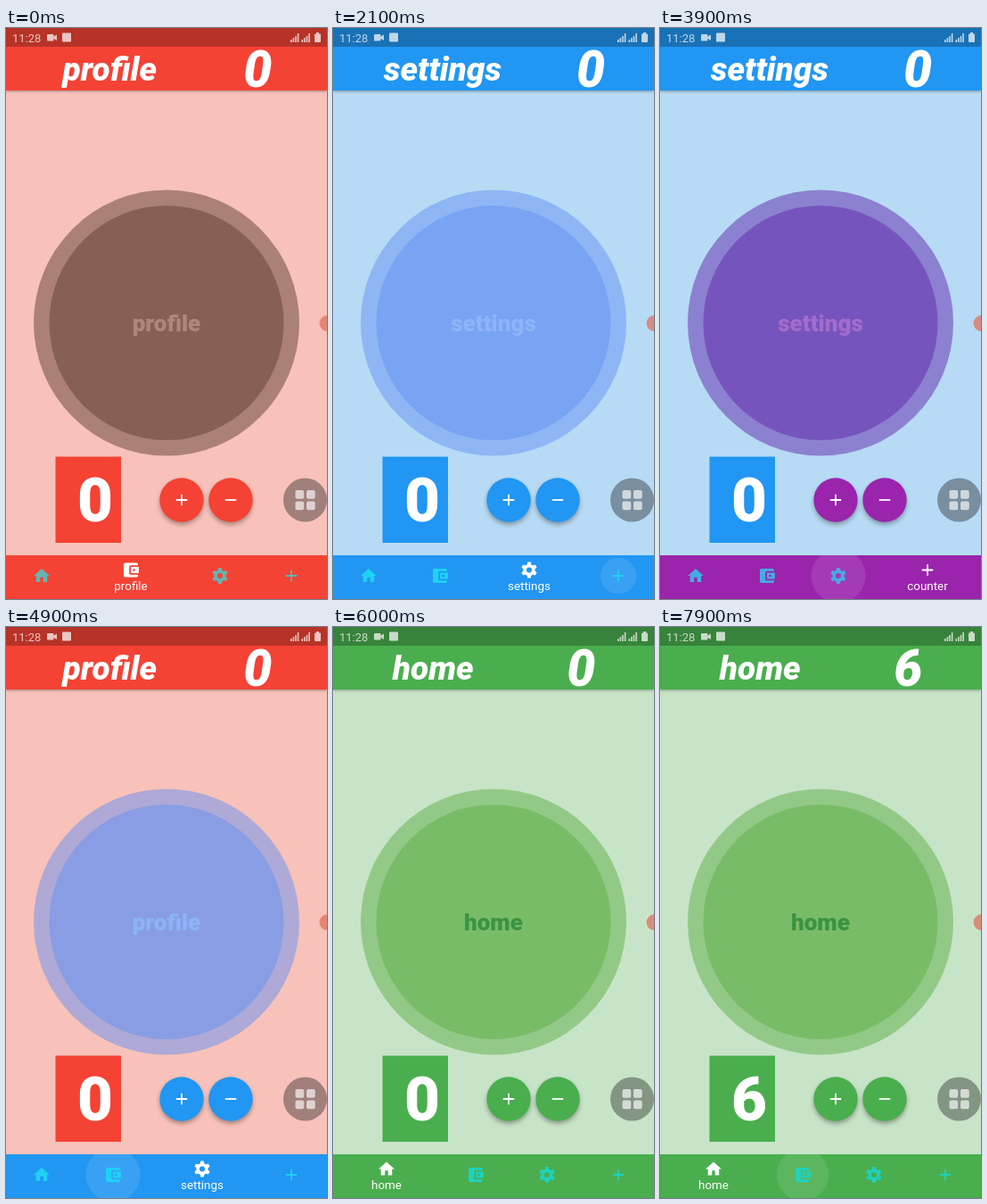
Animation of 360 by 640 pixels, one loop 8 s. Source, as an HTML page:

```html
<!DOCTYPE html>
<html lang="en">
<head>
<meta charset="utf-8">
<style>
  html, body { margin: 0; width: 100%; height: 100%; overflow: hidden; }
  svg { display: block; width: 360px; height: 640px; font-family: Roboto, sans-serif; }
  .heavy { font-weight: 900; }
  .raised { filter: drop-shadow(0 3px 2.5px rgba(0,0,0,.32)); }
</style>
</head>
<body>
<svg id="stage" viewBox="0 0 360 640"></svg>
<script>
const LOOP = 8000, NAV_MS = 150;

// main: theme, bg: page, disc: overlay tint, word: disc label, icon: idle tab icons
const pages = [
  { name: 'home', main: [74, 174, 78], bg: [200, 228, 200], disc: [96, 176, 72], word: [58, 148, 66], icon: [30, 210, 190], titleW: 94 },
  { name: 'profile', main: [244, 66, 52], bg: [248, 194, 186], disc: [99, 66, 50], word: [176, 134, 124], icon: [100, 180, 176], titleW: 110 },
  { name: 'settings', main: [33, 150, 242], bg: [183, 219, 245], disc: [102, 146, 244], word: [140, 180, 247], icon: [30, 210, 245], titleW: 137 },
  { name: 'counter', main: [154, 36, 172], bg: [220, 184, 224], disc: [98, 40, 172], word: [163, 109, 203], icon: [70, 170, 230], titleW: 130 }
];

// each tap: tab, finger down, page swap, start of tab bar change
const taps = [
  [2, 780, 800, 800],
  [3, 2100, 2180, 2220],
  [2, 3700, 3850, 3910],
  [1, 4700, 4850, 4910],
  [0, 5600, 5720, 5800],
  [1, 7850, 9000, 9000]
];
const FIRST_CLICK = 6800, CLICK_GAP = 140, CLICKS = 6;

const clamp = v => Math.max(0, Math.min(1, v));
const ease = v => 1 - (1 - clamp(v)) ** 2;
const mix = (a, b, k) => a + (b - a) * k;
const blend = (a, b, k) => a.map((v, i) => mix(v, b[i], k));
const rgb = c => `rgb(${c.map(Math.round)})`;

const circle = (x, y, r, fill, more = '') => `<circle cx="${x}" cy="${y}" r="${r}" fill="${fill}" ${more}/>`;
const rect = (x, y, w, h, fill, more = '') => `<rect x="${x}" y="${y}" width="${w}" height="${h}" fill="${fill}" ${more}/>`;
const text = (s, x, y, size, fill = '#fff', more = 'text-anchor="middle"') =>
  `<text x="${x}" y="${y}" font-size="${size}" fill="${fill}" ${more}>${s}</text>`;
const heavy = 'class="heavy" text-anchor="middle"';

const plus = '<path d="M19 13h-6v6h-2v-6H5v-2h6V5h2v6h6z"/>';
const minus = '<path d="M5 11h14v2H5z"/>';
const gear = '<circle cx="12" cy="12" r="5.4" fill="none" stroke="currentColor" stroke-width="4"/>' +
  [0, 60, 120, 180, 240, 300].map(a => `<path d="M10 2h4l.8 4h-5.6z" transform="rotate(${a} 12 12)"/>`).join('');
const icons = [
  '<path d="M10 20v-6h4v6h5v-8h3L12 3 2 12h3v8z"/>',
  '<path fill-rule="evenodd" d="M21 18v1c0 1.1-.9 2-2 2H5c-1.1 0-2-.9-2-2V5c0-1.1.9-2 2-2h14c1.1 0 2 .9 2 2v1h-9c-1.1 0-2 .9-2 2v8c0 1.1.9 2 2 2zM12 16h10V8H12zM14.5 12a1.5 1.5 0 0 1 3 0a1.5 1.5 0 0 1-3 0z"/>',
  gear, plus
];
const icon = (art, x, y, color) =>
  `<g transform="translate(${x} ${y}) scale(.89) translate(-12 -12)" fill="${color}" color="${color}">${art}</g>`;

function statusBar() {
  const bars = x => [3, 5, 7, 10].map((h, i) => rect(x + i * 2.6, 16 - h, 1.6, h, '#fff')).join('');
  return rect(0, 0, 360, 21, 'rgba(0,0,0,.25)') +
    '<g opacity=".72">' + text('11:28', 7, 15.5, 13, '#fff', '') +
    rect(46, 7, 7.5, 7.5, '#fff', 'rx="1"') + '<path d="M53 10l4-2.5v6.500l-4-2.500z" fill="#fff"/>' +
    rect(63, 5.5, 10, 10, '#fff', 'rx="1"') + bars(319) + bars(331.5) +
    rect(346, 6.500, 7, 9.500, '#fff', 'rx="1"') + rect(348, 5, 3, 2, '#fff') + '</g>';
}

function header(page, count) {
  const gap = (332 - page.titleW - 33) / 4;
  return rect(0, 0, 360, 70, rgb(page.main), 'style="filter:drop-shadow(0 1px 1.5px rgba(0,0,0,.35))"') + statusBar() +
    text(page.name, 14 + gap + page.titleW / 2, 59, 37, '#fff', heavy + ' font-style="italic"') +
    text(count, 346 - gap - 16.500, 65.500, 57, '#fff', heavy + ' font-style="italic"');
}

function tabBar(from, to, k, ripple) {
  const weights = pages.map((_, i) => 1 + .5 * ((i === from ? 1 - k : 0) + (i === to ? k : 0)));
  let x = 0;
  const centers = weights.map(w => (x += w * 80) - w * 40);
  let out = rect(0, 591, 360, 49, rgb(pages[from].main));
  if (k > 0) out += circle(centers[to], 614, k * 340, rgb(pages[to].main));
  if (ripple) out += circle(centers[ripple.tab], 614, ripple.r, '#fff', `opacity="${ripple.alpha}"`);
  const idle = blend(pages[from].icon, pages[to].icon, k);
  pages.forEach((p, i) => {
    const on = (weights[i] - 1) * 2;
    out += icon(icons[i], centers[i], 614 - 6.500 * on, rgb(blend(idle, [255, 255, 255], on)));
    if (on > 0) out += text(p.name, centers[i], 630, 13.400, '#fff', `text-anchor="middle" opacity="${on}"`);
  });
  return `<g clip-path="url(#bar)">${out}</g>`;
}

function draw(t) {
  let body = 1, from = 1, to = 1, k = 1, ripple = null;
  for (const [tab, down, swap, nav] of taps) {
    if (t >= swap) body = tab;
    if (t >= nav) { from = to; to = tab; k = ease((t - nav) / NAV_MS); }
    if (t >= down && t < nav + NAV_MS)
      ripple = { tab, r: mix(20, 30.500, ease((t - down) / 80)), alpha: .1 * (1 - clamp((t - nav) / NAV_MS)) };
  }
  const count = Math.max(0, Math.min(CLICKS, Math.floor((t - FIRST_CLICK) / CLICK_GAP) + 1));
  const press = t >= FIRST_CLICK && t < 7700 ? .14 : 0;

  const page = pages[body];
  const tint = key => rgb(blend(pages[from][key], pages[to][key], k));
  const fab = tint('main'), disc = tint('disc');

  stage.innerHTML = '<clipPath id="bar"><path d="M0 591h360v49H0z"/></clipPath>' +
    rect(0, 0, 360, 640, rgb(page.bg)) + header(page, count) +
    circle(180, 330.500, 149, disc, 'opacity=".5"') +
    circle(180, 330.500, 131.500, disc, 'opacity=".5"') +
    text(page.name, 180, 339.500, 26, tint('word'), heavy) +
    rect(55.500, 480.500, 73.500, 96.500, rgb(page.main)) +
    text(count, 100, 553, 69, '#fff', heavy) +
    circle(197, 529, 24.700, fab, 'class="raised"') + circle(252, 529, 24.700, fab, 'class="raised"') +
    circle(197, 529, 24.700, '#fff', `opacity="${press}"`) +
    icon(plus, 197, 529, '#fff') + icon(minus, 252, 529, '#fff') +
    circle(360.500, 331, 9, '#e0705f', 'opacity=".75"') +
    circle(335.500, 529, 24.500, 'rgba(20,20,20,.38)') +
    [324.500, 337].map(x => [518, 530.500].map(y => rect(x, y, 9.700, 9.700, '#fff', 'rx="2" opacity=".65"')).join('')).join('') +
    tabBar(from, to, k, ripple);
}

const stage = document.getElementById('stage');
const start = performance.now();
function tick() {
  draw((performance.now() - start) % LOOP);
  requestAnimationFrame(tick);
}
tick();
</script>
</body>
</html>
```
